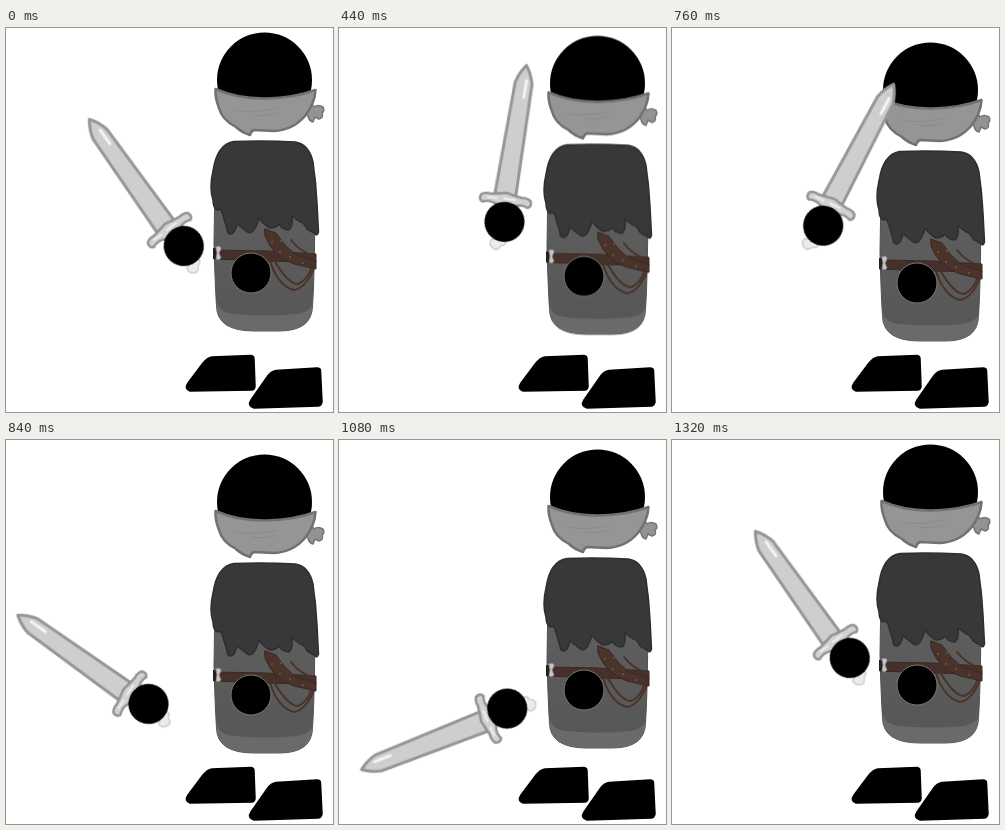
These frames come from a looping animation (327 by 384 pixels, 1480 ms). An HTML page:

```html
<!DOCTYPE html>
<html lang="en">
<head>
<meta charset="utf-8">
<title>Sword swing</title>
<style>
  html, body { margin: 0; width: 100%; height: 100%; overflow: hidden; background: #fff; }
  svg { display: block; width: 100vw; height: 100vh; }
  path { stroke-linejoin: round; stroke-linecap: round; }

  .bob, .swing { animation: 1480ms infinite; }
  .bob { animation-name: bob; }
  .swing { animation-name: swing; }

  /* 40 ms per step: 280 down to 800, back up by 1320 */
  @keyframes bob {
    0% { transform: translateY(0); }
    18.9189% { transform: translateY(0); animation-timing-function: steps(13, end); }
    54.0541% { transform: translateY(10.8px); animation-timing-function: steps(13, end); }
    89.1892%, 100% { transform: translateY(0); }
  }

  /* raise 320-600, hold, strike 720-920, hold, recover 1000-1320 */
  @keyframes swing {
    0% { transform: translate(203.5px, 193.9px) rotate(-36.6deg); }
    21.6216% { transform: translate(203.5px, 193.9px) rotate(-36.6deg); animation-timing-function: steps(7, end); }
    40.5405% { transform: translate(197px, 188.3px) rotate(67.7deg); }
    48.6486% { transform: translate(197px, 188.3px) rotate(67.7deg); animation-timing-function: steps(5, end); }
    62.1622% { transform: translate(133.5px, 245.8px) rotate(-138deg); }
    67.5676% { transform: translate(133.5px, 245.8px) rotate(-138deg); animation-timing-function: steps(8, end); }
    89.1892%, 100% { transform: translate(203.5px, 193.9px) rotate(-36.6deg); }
  }
</style>
</head>
<body>
<svg viewBox="0 0 327 384" preserveAspectRatio="none">
  <defs>
    <linearGradient id="cloth" x1="0" y1="0" x2="0" y2="1">
      <stop offset="0" stop-color="#606060"/>
      <stop offset="1" stop-color="#565656"/>
    </linearGradient>
  </defs>

  <g id="feet" stroke="#000" stroke-width="1.5">
    <path d="M206 329 L245 327.500 Q248 328 248 331 L249 358 Q249 361.500 246 362 L184 363 Q178 361 182 355 L197 335 Q201 330 206 329Z"/>
    <path d="M270 342.500 L311 340 Q314.500 340 314.500 343 L316 374 Q315 378 312 378 L248 380 Q241 378 245 372 L261 349 Q265 343 270 342.500Z"/>
  </g>

  <g class="bob">
    <g id="body">
      <path d="M209 150 L208 215 Q209 255 210.500 278 Q211 303 248 303 L273 303 Q306 303 306.500 278 Q309 240 309 150Z" fill="url(#cloth)" stroke="#505050"/>
      <path d="M210.500 272 Q212 285 228 286 Q262 289 290 286 Q305 284 307 274 L306.500 278 Q306 303 273 303 L248 303 Q211 303 210.500 278Z" fill="#6a6a6a"/>

      <path d="M208 222 L260 223 L310 226 L310 234 L258 233 L208 231Z" fill="#46312a" stroke="#3a2822"/>
      <g fill="none" stroke="#4a3229" stroke-width="2">
        <path d="M264 233 Q272 258 288 262 Q300 260 308 240"/>
        <path d="M268 232 Q282 256 292 256 Q302 252 306 238"/>
        <path d="M285 212 Q294 224 309 228"/>
      </g>
      <path d="M259 201 L270 205 Q278 218 290 227 L310 233 L310 241 L288 236 Q267 229 259 208Z" fill="#49332a" stroke="#3a2822"/>
      <g fill="#8a7468">
        <circle cx="266" cy="214" r=".8"/><circle cx="275" cy="213" r=".8"/>
        <circle cx="274" cy="224" r=".8"/><circle cx="284" cy="229" r=".8"/>
        <circle cx="297" cy="235" r=".8"/>
      </g>
      <path d="M207 220 h3 v11 h-3Z" fill="#222"/>
      <path d="M210 219 Q215 217 215 221 L213 225 L215 230 Q213 233 210 231 L211 225Z" fill="#c4c4c4" stroke="#909090" stroke-width=".8"/>

      <path d="M228 113.500 Q259 112.500 289 114 Q303 116 307 134 Q310 155 311 175 L312.500 204 Q311 209 308 205 L301 201 Q297 193 294 194 L286 188 Q287 199 283 202 Q276 202 273 196 Q270 200 264 200 Q257 196 253 190 Q250 201 246 204 Q243 206 240 203 L231 196 Q229 205 225 206 Q221 206 221 201 L216 184 Q214 180 212 182 Q207 181 207 172 Q203 160 207 143 Q211 116 228 113.500Z" fill="#383838" stroke="#2e2e2e" stroke-width="1.5"/>
    </g>

    <g id="head">
      <circle cx="258.500" cy="52" r="47.500"/>
      <path d="M297 83 L302 81 L302 74 Q305 73 308 79 Q312 76 317 79 Q319 83 316 85 Q318 90 313 91 L309 89 L307 94 Q303 93 302 88Z" fill="#939393" stroke="#747474" stroke-width="1.5"/>
      <path d="M209.500 61 Q232 71 260 70.500 Q288 70 309.500 62 Q309 75 299 88 Q287 102 268 103 L248 102 Q245 103 244 107 Q235 104 230 99 Q216 92 213 80 Q209 70 209.500 61Z" fill="#959595" stroke="#717171" stroke-width="2.5"/>
      <path d="M228 82 Q247 86 272 80 M247 87 Q260 89 270 85" fill="none" stroke="#8b8b8b"/>
    </g>

    <circle cx="245" cy="245" r="20" stroke="#777"/>

    <g class="swing">
      <g id="sword" transform="translate(-35 4)">
        <path d="M-5 17 L4 19 Q5 23 0 24 Q-3 30 -7 28 Q-13 25 -11 20Z" fill="#ececec" stroke="#cfcfcf" stroke-width="1.5"/>
        <g transform="translate(-3.500 0) rotate(1.200)">
          <path d="M-10.500 -27 L-8.500 -140 Q-6 -150 0 -158 Q6 -150 8.500 -140 L10.500 -27Z" fill="#cecece" stroke="#969696" stroke-width="3"/>
          <path d="M2.500 -143 V-126" fill="none" stroke="#f4f4f4" stroke-width="3"/>
        </g>
        <g transform="translate(-2 1)">
          <path d="M-25 -25 Q-22 -28 -16 -27 Q-8 -28 0 -30 Q8 -28 16 -27 Q22 -28 25 -25 Q27 -20 23 -18 Q16 -21 10 -18 Q0 -16 -10 -18 Q-16 -21 -23 -18 Q-27 -20 -25 -25Z" fill="#d2d2d2" stroke="#949494" stroke-width="2.5"/>
          <path d="M-18 -23.500 H-9 M-2 -24 H9" fill="none" stroke="#ededed" stroke-width="2"/>
        </g>
        <circle r="20"/>
      </g>
    </g>
  </g>
</svg>
</body>
</html>
```
